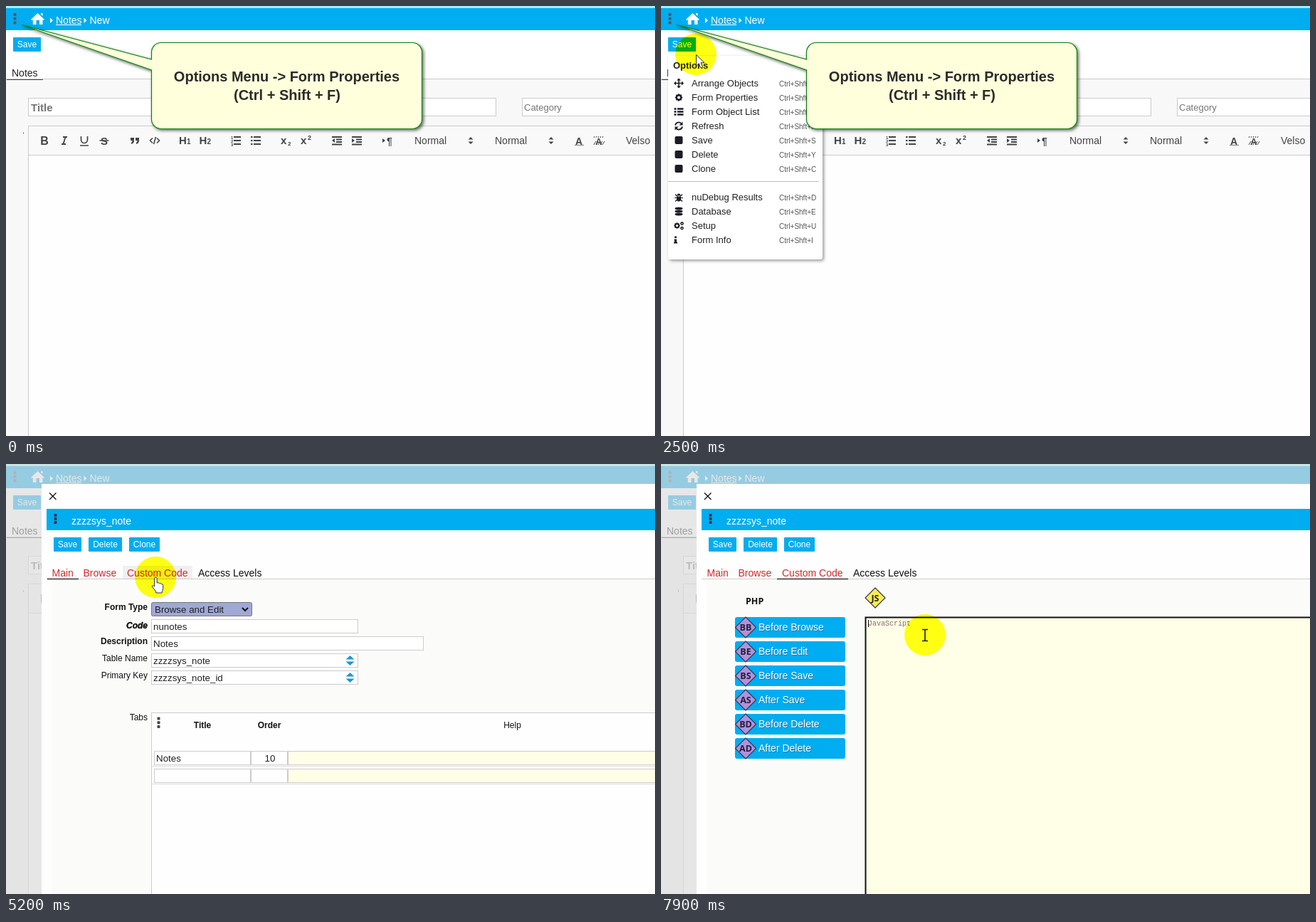
An HTML page for the animation above (8000 ms loop, 912 by 604 pixels).

```html
<!DOCTYPE html>
<html lang="en">
<head>
<meta charset="utf-8">
<title>Form properties walkthrough</title>
<style>
  html, body { margin: 0; width: 100%; height: 100%; overflow: hidden; background: #fff; }
  svg { display: block; width: 912px; height: 604px; }
  text { font-family: "Liberation Sans", sans-serif; white-space: pre; }
  .ui { font-family: "Open Sans", sans-serif; }
  .mono { font-family: "Liberation Mono", monospace; }
</style>
</head>
<body>
<svg id="stage" viewBox="0 0 912 604" xmlns="http://www.w3.org/2000/svg"></svg>
<script>
const BLUE = '#00adf0', LINE = '#ccc', INK = '#444', CREAM = '#ffffe8';

// Drawing helpers: each returns SVG markup.
const text = (x, y, s, size = 14, fill = '#222', more = '') =>
  `<text x="${x}" y="${y}" font-size="${size}" fill="${fill}" ${more}>${s}</text>`;
const rect = (x, y, w, h, fill, more = '') =>
  `<rect x="${x}" y="${y}" width="${w}" height="${h}" fill="${fill}" ${more}/>`;
const box = (x, y, w, h, fill = '#fff', stroke = LINE, more = '') =>
  rect(x + .5, y + .5, w - 1, h - 1, fill, `stroke="${stroke}" ${more}`);
const line = (d, stroke = INK, width = 1, more = '') =>
  `<path d="${d}" fill="none" stroke="${stroke}" stroke-width="${width}" ${more}/>`;
const shape = (d, fill = INK, more = '') => `<path d="${d}" fill="${fill}" ${more}/>`;
const group = (id, body, more = '') => `<g id="${id}" ${more}>${body}</g>`;
const at = (x, y, body) => `<g transform="translate(${x} ${y})">${body}</g>`;
const bold = 'font-weight="700"', mid = 'text-anchor="middle"', end = 'text-anchor="end"';

const dots = (x, y, gap, fill) =>
  [0, 1, 2].map(i => rect(x - 2, y + i * gap - 2, 4, 4, fill, 'rx="1"')).join('');
const button = (x, y, w, s) =>
  rect(x, y, w, 20, BLUE, 'rx="1"') + text(x + w / 2, y + 14, s, 12, '#fff', mid);
const upDown = (x, y, w, h, gap, fill) =>
  shape(`M${x - w} ${y - gap}h${2 * w}l${-w} ${-h}zM${x - w} ${y + gap}h${2 * w}l${-w} ${h}z`, fill);
const diamond = (x, y, r, s, fill, ink) =>
  shape(`M${x} ${y - r}L${x + r} ${y}L${x} ${y + r}L${x - r} ${y}Z`, fill,
    'stroke="#3b3854" stroke-width="1.2" stroke-linejoin="round"') +
  text(x, y + 4.5, s, 12.5, ink, `class="ui" ${bold} ${mid}`);

function toolbar() {
  const y = 189, sym = (x, s, more = '', size = 15) => text(x, y + 5.5, s, size, INK, `${mid} ${more}`);
  const rows = (x, list) => [-5, 0, 5].map((d, i) =>
    line(`M${x - 3} ${y + d}h10`, INK, 2) +
    (list ? text(x - 7, y + d + 2.5, i + 1, 6, INK, bold) : rect(x - 7, y + d - 1, 2.5, 2, INK))).join('');
  const indent = (x, dir) =>
    line(`M${x - 7} ${y - 5}h14M${x - 1} ${y - 1.5}h8M${x - 1} ${y + 2}h8M${x - 7} ${y + 5.5}h14`, INK, 1.8) +
    shape(dir < 0 ? `M${x - 7} ${y}l4 -3v6z` : `M${x - 3} ${y}l-4 -3v6z`);
  const hatch = [0, 1, 2, 3, 4].map(i =>
    `M${827 + i * 3} ${y - 6}l-1 2M${826 + i * 3} ${y + 6}l3 -5`).join('');
  return sym(54, 'B', bold, 16) +
    line(`M80 ${y - 5}h6M78 ${y + 5}h6M83.500 ${y - 5}l-3 10`, INK, 1.8) +
    line(`M105.500 ${y - 6}v5a4.500 4.500 0 0 0 9 0v-5M104 ${y + 7}h12`, INK, 1.7) +
    sym(138, 'S', bold) + line(`M131.500 ${y}h13`, INK, 1.5) +
    shape(`M175 ${y - 4}h5v4q0 4-4 5v-2q1.500-1 1.500-3h-2.500zM182 ${y - 4}h5v4q0 4-4 5v-2q1.500-1 1.500-3h-2.500z`) +
    line(`M206 ${y - 3.5}l-3.500 3.500 3.500 3.500M212 ${y - 3.5}l3.500 3.500-3.500 3.500M210.500 ${y - 5}l-3 10`, INK, 1.6) +
    ['1', '2'].map((n, i) => text(243 + i * 28.5, y + 5, 'H', 15, INK, bold) +
      text(254 + i * 28.5, y + 5, n, 10, INK, bold)).join('') +
    rows(323, true) + rows(351, false) +
    text(386, y + 5, 'x', 15, INK, bold) + text(396, y + 7, '2', 8, INK, bold) +
    text(414, y + 5, 'x', 15, INK, bold) + text(424, y - 1, '2', 9, INK, bold) +
    indent(465, -1) + indent(493, 1) +
    shape(`M529 ${y - 3}l4 3-4 3z`) + sym(539, '¶', bold, 14) +
    text(574, y + 5, 'Normal', 14, INK) + upDown(653, y, 3.5, 3.5, 1.5, INK) +
    text(687, y + 5, 'Normal', 14, INK) + upDown(766, y, 3.5, 3.5, 1.5, INK) +
    sym(805, 'A', bold, 14) + line(`M799 ${y + 6.5}h13`, '#999', 1.5) +
    line(hatch, INK, 1) + sym(833, 'A', bold, 13) +
    text(871, y + 5, 'Velso', 14, INK);
}

function page() {
  return rect(0, 0, 912, 604, '#fff') + rect(0, 103, 912, 501, '#f8f8f8') +
    rect(0, 0, 912, 3, '#a4eefa') + rect(0, 3, 912, 31, BLUE) + dots(12.5, 12, 5.7, '#5b5560') +
    shape('M35 19L44.500 10L54 19L52.500 20L51.500 19.200V26H47V20H42.500V26H37.800V19.200L36.500 20ZM49 10h2.500v4l-2.500-2z', '#fff') +
    shape('M62 16.500l4 3.800-4 3.800zM109.500 16.500l4 3.800-4 3.800z', '#fff') +
    text(70, 25, 'Notes', 14, '#fff') + line('M70 26.500h36', '#fff') + text(117.5, 25, 'New', 14, '#fff') +
    button(10, 44, 39, 'Save') + text(8, 99, 'Notes') +
    line('M0 102.500H912', LINE) + line('M1 103.500H52', '#444') + text(23, 179, '.', 11) +
    box(31, 129, 658, 26) + text(35, 148, 'Title', 15, '#757575', bold) +
    box(725, 129, 200, 26) + text(728, 147, 'Category', 13, '#757575') +
    box(31, 168, 900, 42, '#f9f9f9') + box(31, 209, 900, 420, '#fefefe') + toolbar();
}

function menu() {
  const items = [['Arrange Objects', 'D'], ['Form Properties', 'F'], ['Form Object List', 'O'], ['Refresh', 'R'],
    ['Save', 'S'], ['Delete', 'Y'], ['Clone', 'C'], null,
    ['nuDebug Results', 'D'], ['Database', 'E'], ['Setup', 'U'], ['Form Info', 'I']];
  const ink = '#1c1c24';
  const gear = (x, y, r) => `<circle cx="${x}" cy="${y}" r="${r}" fill="none" stroke="${ink}" stroke-width="${r * .75}"/>` +
    [0, 45, 90, 135].map(a => `<path d="M0 ${-r * 1.6}V${-r}M0 ${r}V${r * 1.6}" stroke="${ink}" stroke-width="1.6" transform="translate(${x} ${y}) rotate(${a})"/>`).join('');
  const block = rect(-5.5, -5.5, 11, 11, ink, 'rx="2"');
  const icons = [
    line('M-5 0H5M0 -5V5', ink, 1.6) + shape('M0 -7l3 3h-6zM0 7l3 -3h-6zM-7 0l3 -3v6zM7 0l-3 -3v6z', ink),
    gear(0, 0, 3.3),
    line('M-6.500 -4h3M-2 -4h8.500M-6.500 0h3M-2 0h8.500M-6.500 4h3M-2 4h8.500', ink, 2.6),
    line('M-5 -1A5 5 0 0 1 4 -3M5 1A5 5 0 0 1 -4 3', ink, 1.8) + shape('M5.500 -6v5h-5zM-5.500 6v-5h5z', ink),
    block, block, block, '',
    shape('M-3 -1h6v4a3 3 0 0 1-6 0zM-2.500 -2a2.500 3 0 0 1 5 0z', ink) + line('M-6 1h12M-5 -4l3 3M5 -4l-3 3M-5 6l3-3M5 6l-3-3', ink, 1.2),
    [-4, 0, 4].map(y => `<ellipse cy="${y}" rx="5.500" ry="1.900" fill="${ink}"/>`).join(''),
    gear(-2.5, 0, 2.6) + gear(4.5, -3, 1.4) + gear(4.5, 3.5, 1.4),
    rect(-6, -5, 3, 2.5, ink) + shape('M-6.500 -1h3.500v4h1v2h-5v-2h1v-2h-.500z', ink)
  ];
  return rect(10, 70, 217, 286, '#fff', 'rx="4" filter="url(#soft)"') +
    text(17, 88, 'Options', 13, '#222', bold) + line('M10 246.500H222', '#bbb') +
    items.map((it, i) => it ? at(25, 108.5 + i * 20, icons[i]) + text(43, 113 + i * 20, it[0], 13) +
      text(166, 113 + i * 20, 'Ctrl+Shft+' + it[1], 10, '#555') : '').join('');
}

function callout() {
  return shape('M218 51.500H571A13.500 13.500 0 0 1 584.500 65V159A13.500 13.500 0 0 1 571 172.500H218A13.500 13.500 0 0 1 204.500 159V90L22 26.500L204.500 75V65A13.500 13.500 0 0 1 218 51.500Z',
      '#ffffdc', 'stroke="#0b820b" stroke-width="1.2" filter="url(#drop)"') +
    text(394.5, 106, 'Options Menu -&gt; Form Properties', 20, '#2b2b2b', `${bold} ${mid}`) +
    text(395, 132, '(Ctrl + Shift + F)', 20, '#2b2b2b', `${bold} ${mid}`);
}

function mainTab() {
  const label = (y, s, more = '') => text(199, y, s, 12, '#111', `${end} ${more}`);
  const field = (y, w, s) => box(204, y, w, 20) + text(207, y + 15, s, 13.33);
  const row = y => box(208, y, 136, 20) + box(344, y, 52, 20) + box(396, y, 540, 20, CREAM);
  return label(205, 'Form Type', bold) + label(231, 'Code', `${bold} font-style="italic" stroke="#111" stroke-width=".4"`) +
    label(253, 'Description', bold) + label(277, 'Table Name') + label(301, 'Primary Key') + label(360, 'Tabs') +
    box(204, 194, 142, 20, '#a0a8d5', '#777', 'rx="2"') + text(209, 209, 'Browse and Edit', 13.33) +
    line('M332 202l4 4 4-4', '#111', 2) +
    field(218, 291, 'nunotes') + field(242, 383, 'Notes') +
    field(266, 291, 'zzzzsys_note') + field(290, 291, 'zzzzsys_note_id') +
    upDown(483.5, 276, 6, 5.5, 1.5, '#1b97cf') + upDown(483.5, 300, 6, 5.5, 1.5, '#1b97cf') +
    box(204, 349, 740, 300, '#fdfefd') + dots(214.5, 357.5, 5.7, '#444') +
    text(276, 371, 'Title', 12, '#111', `${bold} ${mid}`) + text(370, 371, 'Order', 12, '#111', `${bold} ${mid}`) +
    text(711.5, 371, 'Help', 12, '#111', mid) + row(403) + row(428) +
    line('M205 424.500H912M205 449.500H912', '#ddd') +
    text(211, 418, 'Notes', 13.33) + text(371, 418, '10', 13.33, '#222', mid);
}

function codeTab() {
  const hooks = ['Before Browse', 'Before Edit', 'Before Save', 'After Save', 'Before Delete', 'After Delete'];
  return text(119, 197, 'PHP', 12.5, '#111', `class="ui" ${bold}`) +
    hooks.map((s, i) => {
      const y = 215 + i * 34, code = s.replace(/[^A-Z]/g, '');
      return rect(104, y, 155, 29, BLUE, 'rx="3"') + diamond(119, y + 14.5, 14.5, code, '#b092dc', '#241f3a') +
        text(137.6, y + 19.6, s, 14, '#0878a8') + text(137, y + 19, s, 14, '#fff');
    }).join('') +
    box(287, 215, 700, 450, CREAM, LINE, 'id="editor"') +
    text(291, 227, 'JavaScript', 10, '#8a6a76', 'class="mono"') +
    line('M291.500 219v10', '#111', 1, 'id="caret"');
}

function dialog() {
  return rect(50, 28, 862, 576, '#fdfefd') + line('M61 40.500l9.500 9.500M70.500 40.500l-9.500 9.500', '#111', 1.3) +
    group('content',
      rect(57, 63, 855, 30, BLUE) + dots(69.5, 72, 5, '#3c3448') + text(92, 85, 'zzzzsys_note', 14, '#fff') +
      button(67, 103, 39, 'Save') + button(116, 103, 47, 'Delete') + button(173, 103, 43, 'Clone') +
      rect(64, 162, 848, 442, '#fbfcfa') +
      rect(164, 143, 98, 18, '#f0f0f0', 'id="hover"') +
      line('M57 161.500H912', LINE) + line('', '#333', 1.3, 'id="underline"') +
      ['Main', 'Browse', 'Custom Code', 'Access Levels'].map((s, i) =>
        text([64.5, 108.5, 170, 270][i], 158, s, 14, i < 3 ? '#d8262c' : '#111')).join('') +
      group('mainTab', mainTab()) + group('codeTab', codeTab()));
}

const outline = 'stroke="#333" stroke-width="1" stroke-linejoin="round"';
const pointers =
  group('arrow', shape('M.5 .5V16L4.200 12.700L7 19L9.700 17.800L7 11.700H12Z', '#fff', outline)) +
  group('hand', shape('M-1.500 2q0-2 1.800-2t1.800 2v6q3-.800 3.500.700 2.500-.700 3 1 2-.300 2 1.800v4q0 3-1.500 4.500v2h-8.500v-2q-3-3-5.600-7.500 1.500-2 3.500.500z', '#fff', outline)) +
  group('beam', line('M-4 -7.500h3l1 1 1 -1h3M-4 8.500h3l1 -1 1 1h3M0 -6.500v14', '#222', 1.6)) +
  group('busy', '<circle cx="14" cy="0" r="6" fill="none" stroke="#2c93c9" stroke-width="3.500"/>');

document.getElementById('stage').innerHTML = `<defs>
  <filter id="soft" x="-10%" y="-10%" width="125%" height="125%"><feDropShadow dx="2" dy="2" stdDeviation="2" flood-opacity=".4"/></filter>
  <filter id="drop" x="-5%" y="-10%" width="115%" height="130%"><feDropShadow dx="2" dy="2" stdDeviation="2" flood-opacity=".6"/></filter></defs>` +
  page() + group('menu', menu(), 'style="display:none"') +
  rect(0, 0, 912, 604, '#dcdcdc', 'id="veil" opacity=".68"') +
  group('dialog', dialog()) + group('callout', callout()) +
  '<circle id="spot" r="29" fill="#ffff14" style="mix-blend-mode:multiply"/>' +
  group('jsPale', diamond(301, 188, 14, 'JS', '#dccfd6', '#3649ae')) +
  group('jsBright', diamond(301, 188, 14, 'JS', '#f8ee50', '#222')) +
  group('pointer', pointers);

const $ = id => document.getElementById(id);
const show = (id, on) => { $(id).style.display = on ? '' : 'none'; };

// Pointer moves: start time, then a quadratic curve of start, control and end.
const moves = [
  [100, [192, 320], [-14, 105], [12, 18]],
  [1000, [12, 18], [20.5, 28.5], [29, 39]],
  [2300, [29, 39], [59, 82.5], [89, 126]],
  [4600, [89, 126], [224, 183], [212, 148]],
  [6500, [212, 148], [291.5, 194], [371, 240]]
];
const LOOP = 8000, TICK = 100, MOVE = 900;

function pointerAt(t) {
  const [start, a, c, b] = moves.filter(m => m[0] <= t).pop() || moves[0];
  const u = Math.min(1, Math.max(0, (t - start + TICK) / MOVE)), v = 1 - u;
  return a.map((p, i) => v * v * p + 2 * u * v * c[i] + u * u * b[i]);
}

function draw(ms) {
  const t = Math.floor(ms / TICK) * TICK;
  const [x, y] = pointerAt(t);
  const open = t >= 3800, code = t >= 5700, focus = t >= 7400;
  const overTab = t >= 3900 && x > 164 && x < 262 && y > 138 && y < 172;
  const overEditor = code && x > 289 && y > 216;

  show('menu', t >= 1000 && t < 3200);
  show('veil', t >= 3500);
  show('callout', !open);
  show('dialog', open);
  show('content', t >= 3900);
  show('mainTab', !code);
  show('codeTab', code);
  show('hover', overTab && !code);
  $('underline').setAttribute('d', code ? 'M163 161.500H263' : 'M58 161.500H102');
  $('editor').setAttribute('stroke', focus ? '#111' : LINE);
  $('editor').setAttribute('stroke-width', focus ? 2 : 1);
  show('caret', focus);
  show('jsPale', code && !focus);
  show('jsBright', focus);

  show('spot', t >= 100);
  show('pointer', t >= 100);
  const place = `translate(${x.toFixed(1)} ${y.toFixed(1)})`;
  $('spot').setAttribute('transform', place);
  $('pointer').setAttribute('transform', place);
  show('hand', overTab);
  show('beam', overEditor);
  show('arrow', !overTab && !overEditor);
  show('busy', t >= 3500 && t < 3800);
}

const origin = performance.now();
function tick() {
  draw((performance.now() - origin) % LOOP);
  requestAnimationFrame(tick);
}
draw(0);
requestAnimationFrame(tick);
</script>
</body>
</html>
```
